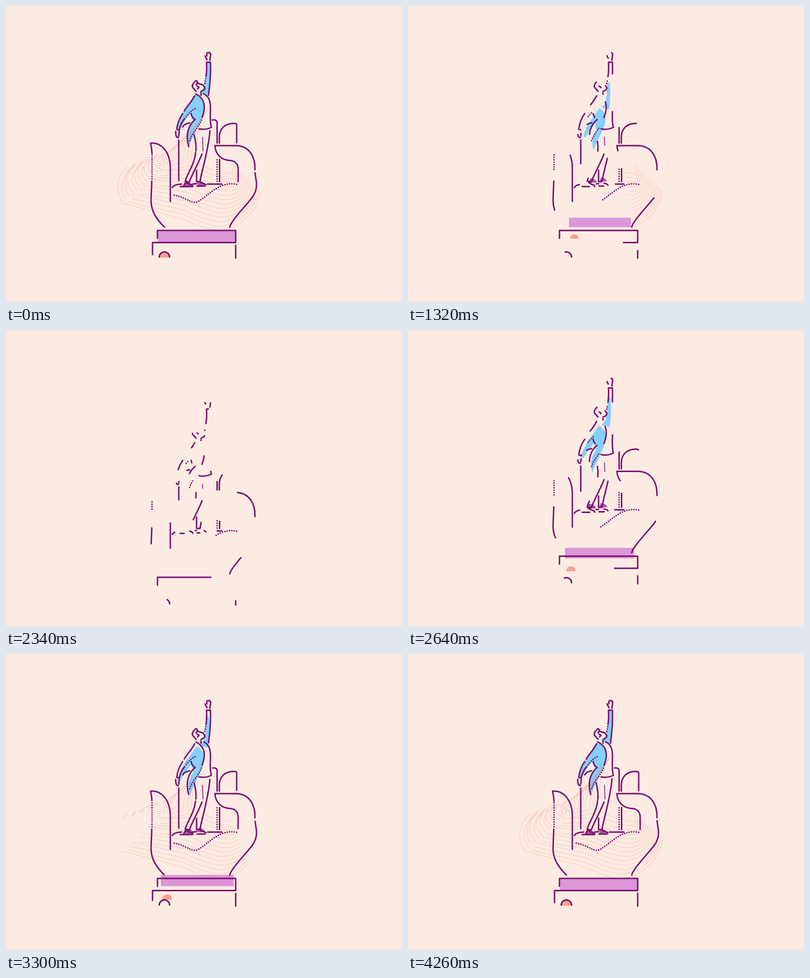
Animation, 800 px wide and 600 px high, one loop 4290 ms. Source, as an HTML page with a canvas:

```html
<!DOCTYPE html>
<html lang="en">
<head>
<meta charset="utf-8">
<title>Reaching up</title>
<style>
html, body { margin: 0; width: 100%; height: 100%; overflow: hidden; background: #fcebe3; }
canvas { display: block; width: 800px; height: 600px; }
</style>
</head>
<body>
<canvas id="stage" width="800" height="600"></canvas>
<script>
const ctx = document.getElementById('stage').getContext('2d');
const LOOP = 4290, STEP = 30;
const INK = '#78126f', PRINT = 'rgba(240,128,110,0.2)';

const clamp = x => Math.max(0, Math.min(1, x));
const span = (t, a, b) => clamp((t - a) / (b - a));

function shape(d) {
  const el = document.createElementNS('http://www.w3.org/2000/svg', 'path');
  el.setAttribute('d', d);
  return { path: new Path2D(d), len: el.getTotalLength() };
}

// Each path begins at the end that stays visible longest.
const lines = [
  // hand
  'M294.5 355L293 394C293 418 306 434 320 448',
  'M332 396L332 325C331 298 316 276 292 278Q294 286 295 299',
  'M349 272L349 354',
  'M371 237Q361 238 357 245',
  'M426.5 278L426.5 236Q426 230 417 231',
  'M431 278L431 266C431 248 443 238 460 238Q466 238 466 241L466 277',
  'M503 332C504 304 490 283 464 283L422 283C423 299 433 311 450 313C464 313 469 321 469 331L469 356',
  'M452 448C454 437 478 412 496 390C506 377 507 367 506 358L503 338',
  'M431.5 356L431.5 311',
  'M436 361L407 361',
  'M336 368C339 363 346 361 355 361',
  // sleeve
  'M306 471L306 455L464 455L464 479.5L296 479.5L296 504',
  'M464 511L464 485',
  'M330.5 509A10.3 10.3 0 1 0 309.5 509',
  // trousers and shoes
  'M396 300C390 316 377 339 370 357L362 355C366 340 381 321 383 297',
  'M385 333L385 356L392 356C395 334 409 294 412 253',
  'M383.5 294C385 280 382 270 380 261',
  'M352 366L376 366',
  'M377 366Q378 363 370 361L363 357L359 364',
  'M386 365L402 365',
  'M404 363Q402 360 395 359L391 356',
  'M385 360L377 361',
  // shirt and jacket
  'M390 249Q402 252 415 246Q412 237 413 214C414 195 411 183 399 178',
  'M396 226C403 208 404 188 383 178',
  'M382 230C367 243 363 262 369 285',
  'M381 182C374 196 367 201 360 213',
  'M357 218C350 228 346 240 345 250L350 251.5C352 241 356 234 361 228',
  'M374 218C375 224 378 228 382 230',
  'M348 267Q342 266 343 254',
  'M349 264L350 254',
  // raised arm
  'M404 143Q406 130 405 114L413 114C414 138 412 160 409 181',
  'M412 110L413.5 98Q413 94 408 94.5Q404 95 406 101',
  'M402 101L406 109',
  // head
  'M384 173L377 165Q375 160 380 155L384 151L387 154L384 160',
  'M386 162.5L390 165L387 168',
  'M394 173Q401 171 402 166L398 160L388 157',
  'M394 176L394 181'
].map(shape);

const dotted = [
  'M295 302L295 352',
  'M426.5 355L426.5 307',
  'M466 361.5C432 355 413 381 390 395C377 405 368 388 337 383',
  'M371 273C376 256 389 248 396 228',
  'M364 224C369 218 374 212 382 208',
  'M401.5 157L404 144'
].map(shape);

const fly = shape('M397 266L398 294');

const fills = [
  ['#85d0fb', 'M384 178C398 184 402 198 400 209C398 230 380 254 370 286C364 266 366 247 378 234Q374 228 374 217C364 228 357 238 350 252L344 250C346 236 358 214 366 204Q376 190 384 178Z'],
  ['#85d0fb', 'M404 113L411 113C413 140 412 160 409 181L399 179L390 176Q400 168 401 159Q405 138 404 113Z'],
  ['#dc95d7', 'M307.5 456.5H464.5V480.5H307.5Z'],
  ['#ff9f8e', 'M310 510A11 11.5 0 0 1 332 510Z'],
  ['#a951a8', 'M362 356L371 358Q378 362 378 367H357Z'],
  ['#a951a8', 'M388 355H394Q402 359 404 364H386Z']
].map(([color, d]) => ({ color, path: new Path2D(d) }));

// Nested ridges: a left whorl, long sweeps below, and loops rising to the figure.
const left = [], lower = [], upper = [];
for (let k = 0; k < 14; k++) {
  const wob = 6 * Math.sin(k * 2.3);
  const sx = 330 - 7 * k, sy = 324 + 6 * k;
  const bx = 444 - 1.4 * k, by = 338 + 9 * k;
  const ex = 460 + 4.2 * k, ey = 324 + 4 * k;
  const tx = 322 - 5.5 * k + wob, ty = 296 + 2.2 * k;
  left.push(shape(`M${tx} ${ty}Q${sx - 28} ${(sy + ty) / 2} ${sx - 3} ${sy - 5}`));
  lower.push(shape(`M${sx + wob} ${sy + wob / 2}L${bx - 70} ${by - 24}Q${bx - 28} ${by - 4} ${bx} ${by}` +
    `C${bx + 28} ${by + 2} ${ex - 8} ${ey + 28 + 2 * k} ${ex} ${ey}`));
}
for (let i = 0; i < 10; i++) {
  upper.push(shape(`M${310 + 8 * i} ${326 - 2 * i}Q${314 + 8 * i} ${294 - 6 * i} ${374 + 4 * i} ${268 - 7 * i}`));
}

const ridges = [
  { set: left, out: [0, 560], back: [3220, 3850] },
  { set: lower, out: [550, 1600], back: [2740, 3420] },
  { set: upper, out: [200, 1350], back: [2720, 3650] }
];

function drawn(t) {
  if (t < 2095) return 1 - Math.pow(span(t, 560, 2000), 1.36);
  return 1 - Math.pow(1 - span(t, 2095, 3415), 1.85);
}

function drop(t) {
  return t < 2095 ? 0 : 100 * Math.pow(1 - span(t, 2095, 2705), 1.5);
}

function fillScale(t) {
  if (t < 2100) {
    const x = t / 1000;
    return Math.max(0, 1 + 0.199 * x * x - 0.239 * x * x * x);
  }
  if (t < 2670) return span(t, 2400, 2670);
  const u = t - 2670;
  const fade = clamp((LOOP - t) / 300);
  return 1 + 0.13 * Math.exp(-0.00114 * u) * Math.sin(u * 2 * Math.PI / 360) * fade;
}

function drawFills(s) {
  if (s < 0.01) return;
  ctx.save();
  ctx.translate(395, 322);
  ctx.scale(s, s);
  ctx.translate(-395, -322);
  for (const f of fills) {
    ctx.fillStyle = f.color;
    ctx.fill(f.path);
  }
  ctx.restore();
}

function trim(s, from, to) {
  if (to - from < 0.004) return;
  ctx.setLineDash([s.len * (to - from) + 0.01, s.len * 2]);
  ctx.lineDashOffset = -s.len * from;
  ctx.stroke(s.path);
}

function trimDots(s, p) {
  const gap = 4.8, dash = [];
  for (let at = 0; at <= s.len * p; at += gap) dash.push(0.01, gap);
  dash[dash.length - 1] = s.len * 2;
  ctx.setLineDash(dash);
  ctx.lineDashOffset = 0;
  ctx.stroke(s.path);
}

function drawPrint(t) {
  ctx.strokeStyle = PRINT;
  ctx.lineWidth = 1.8;
  ctx.lineCap = 'round';
  for (const r of ridges) {
    const from = t < 2100 ? span(t, ...r.out) : 0;
    const to = t < 2100 ? 1 : span(t, ...r.back);
    for (const s of r.set) trim(s, from, to);
  }
}

function drawLines(t) {
  const p = drawn(t);
  if (p < 0.01) return;
  ctx.save();
  ctx.translate(0, drop(t));
  ctx.strokeStyle = INK;
  ctx.lineCap = ctx.lineJoin = 'round';
  ctx.lineWidth = 2.9;
  for (const s of lines) trim(s, 0, p);
  ctx.lineWidth = 3.1;
  for (const s of dotted) trimDots(s, p);
  ctx.lineWidth = 1.5;
  trim(fly, 0, p);
  ctx.restore();
}

const start = performance.now();

function frame(now) {
  const t = Math.floor((Math.max(0, now - start) % LOOP) / STEP) * STEP;
  ctx.fillStyle = '#fcebe3';
  ctx.fillRect(0, 0, 800, 600);
  drawFills(fillScale(t));
  drawPrint(t);
  drawLines(t);
  requestAnimationFrame(frame);
}

frame(start);
</script>
</body>
</html>
```
